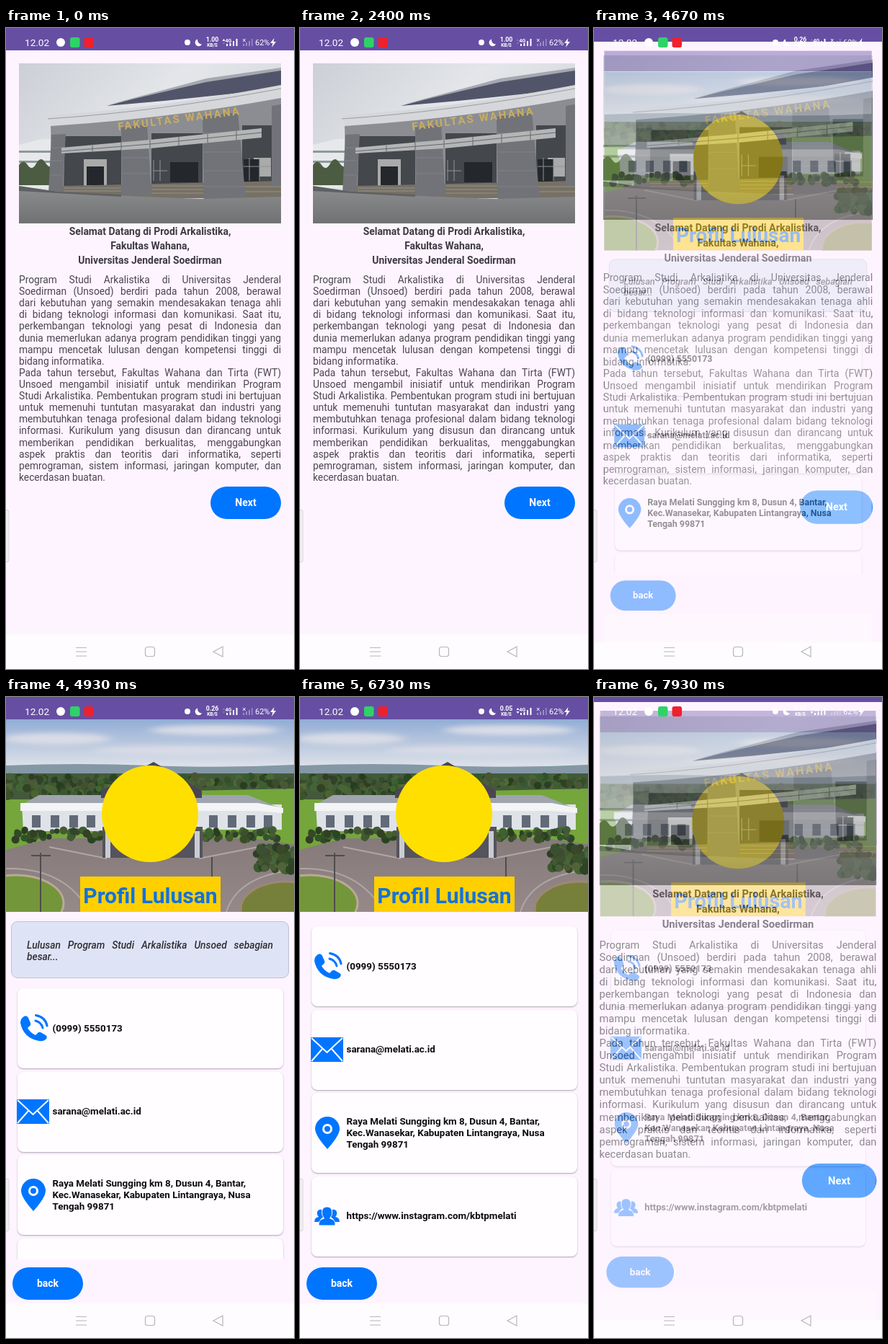
An HTML page for the animation above (8000 ms loop, 400 by 889 pixels).

```html
<!DOCTYPE html>
<html lang="id">
<head>
<meta charset="utf-8">
<style>
html, body { margin: 0; width: 100%; height: 100%; overflow: hidden; }
body { position: relative; font: 13.75px/16.12px Roboto, sans-serif; color: #4a464e; }
div, svg { position: absolute; }
svg { left: 0; top: 0; width: 400px; height: 889px; }
.page { left: 0; top: 0; width: 400px; height: 889px; transform-origin: 200px 444px;
  background: linear-gradient(#664fa3 31px, #fef4ff 31px 841px, #fefcfe 841px); }
.title { left: 0; width: 400px; top: 272px; text-align: center; font: bold 13.9px/20px Roboto, sans-serif; color: #3d3a41; }
.text div { position: static; height: 16.12px; white-space: nowrap; text-align: justify; text-align-last: justify; }
.text .end { text-align-last: left; }
.btn { width: 98px; height: 44.5px; border-radius: 23px; background: #0075ff; color: #fff;
  font: bold 14px/45px Roboto, sans-serif; text-align: center; overflow: hidden; }
.glow { inset: 0; background: #fff; opacity: 0; }
#clip { left: 0; top: 304px; width: 400px; height: 476px; overflow: hidden; }
#list { left: 0; top: -304px; width: 400px; height: 889px; }
.card { left: 15.5px; width: 369px; height: 111px; border-radius: 8px; background: #fffdff; box-shadow: 0 1px 2px #a9a4b0; }
.card span { position: absolute; left: 49px; top: 50%; transform: translateY(-50%); white-space: pre;
  font: bold 13.4px/16px Roboto, sans-serif; color: #0c0c0e; }
.info { left: 7px; top: 311px; width: 384px; height: 77px; border: 1px solid #bcc2d5; border-radius: 9px; background: #dee4f6; }
#bar { left: 387px; width: 4px; background: #9b969f; }
#dot { width: 23px; height: 23px; margin: -12.5px; border: 1px solid #c5bfd4; border-radius: 50%; }
</style>
</head>
<body>
<div class="page" id="home">
  <svg>
    <defs>
      <linearGradient id="cloud" x2="1" y2=".6"><stop stop-color="#cccfd5"/><stop offset=".5" stop-color="#e4e6ea"/><stop offset="1" stop-color="#d2d5da"/></linearGradient>
      <linearGradient id="road" x2="0" y2="1"><stop stop-color="#8b8c8d"/><stop offset="1" stop-color="#707173"/></linearGradient>
      <clipPath id="frame"><path d="M18 49H382V271H18z"/></clipPath>
    </defs>
    <g clip-path="url(#frame)">
      <path fill="url(#cloud)" d="M18 49H382V271H18z"/>
      <path fill="#e6e8e9" d="M18 162L50 154H68V222H18z"/>
      <path fill="#8e979c" d="M18 170H66V173H18zM18 184H66V187H18z"/>
      <path fill="#4c5c42" d="M18 190q6-9 12 0t12-2 12-2 10 6V218H18z"/>
      <path fill="#52556a" d="M140 108L278 71 382 56V84L220 101z"/>
      <path fill="#a5a8af" d="M140 107L278 70 382 55V59L278 75z"/>
      <path fill="#8b8d93" d="M62 134L382 94V230H64z"/>
      <path fill="#44474c" d="M82 150H160V225H80zM202 146H273V219H202zM328 135H382V218H328z"/>
      <path fill="#a9aaa9" d="M108 182H140V219H108zM344 180H368V206H344z"/>
      <path fill="#24272b" d="M112 192H136V218H112zM228 186H267V214H228zM330 182H352V214H330z"/>
      <path fill="none" stroke="#8f9498" d="M205 183V212M214 183V212M204 198H224M338 180V212M352 180V212M330 192H368"/>
      <path fill="#777065" d="M78 219L382 212V236H72z"/>
      <path stroke="#94928c" d="M80 222H160M80 226H160M202 219H274M202 224H274M202 229H274M328 220H382M328 227H382"/>
      <path fill="#717378" d="M63 148L83 147 81 180 78 230H59zM160 138L196 134 202 233H161zM273 123L322 117 333 238H275zM369 108L382 106V218H369z"/>
      <path stroke="#808287" d="M62 166H80M62 184H79M61 204H78M161 158H198M161 180H199M161 202H200M274 146H325M275 172H327M275 198H329M275 220H331"/>
      <path fill="#d6d7da" d="M58 121Q210 112 382 79V97Q230 125 62 136z"/>
      <path fill="none" stroke="#9a9ca2" d="M58 126Q210 116 382 84"/>
      <path fill="#b4b5b6" d="M77 166L200 155 355 139V152L200 167 77 174z"/>
      <path fill="none" stroke="#65676b" d="M77 171L200 161 355 145M120 163V171M160 159V169M200 155V167M240 151V163M280 147V159M320 143V155"/>
      <path fill="url(#road)" d="M18 222L72 229 270 237 382 234V271H18z"/>
      <path fill="#5e6164" d="M18 219L72 227 160 231V234L18 226z"/>
      <text transform="translate(156 142) rotate(-7.4)" font-size="15" font-weight="700" letter-spacing="2.2" fill="#c9ad61">FAKULTAS WAHANA</text>
    </g>
  </svg>
  <div class="title">Selamat Datang di Prodi Arkalistika,<br>Fakultas Wahana,<br>Universitas Jenderal Soedirman</div>
  <div class="text" id="story" style="left:18px;top:341px;width:364px"></div>
  <div class="btn" style="left:284px;top:636px">Next<div class="glow" id="nextGlow"></div></div>
</div>

<div class="page" id="profile">
  <svg>
    <defs>
      <linearGradient id="sky" x2="0" y2="1"><stop stop-color="#92add6"/><stop offset=".45" stop-color="#b9c7de"/><stop offset=".85" stop-color="#dadfe8"/></linearGradient>
      <linearGradient id="yard" x2="0" y2="1"><stop stop-color="#85797a"/><stop offset="1" stop-color="#95898a"/></linearGradient>
      <clipPath id="banner"><path d="M0 31H400V298H0z"/></clipPath>
      <filter id="soft"><feGaussianBlur stdDeviation="8 3"/></filter>
    </defs>
    <g clip-path="url(#banner)">
      <path fill="url(#sky)" d="M0 31H400V104H0z"/>
      <g filter="url(#soft)" fill="#d9dce6"><ellipse cx="70" cy="58" rx="75" ry="8"/><ellipse cx="290" cy="46" rx="90" ry="7"/><ellipse cx="250" cy="74" rx="130" ry="6"/></g>
      <path fill="#8497a5" d="M0 95Q100 91 200 95T400 94V112H0z"/>
      <path fill="#74a63c" d="M0 120H400V215H0z"/>
      <path fill="#43593a" d="M0 106H400V127L260 130 140 142H0z"/>
      <g id="trees"></g>
      <path fill="url(#yard)" d="M0 212L60 196H340L400 204V298H0z"/>
      <path fill="none" stroke="#b1a6a3" stroke-width="2" d="M0 238Q82 236 116 298M400 240Q322 248 306 298M60 208L140 224M268 224L350 208"/>
      <path fill="#dfe2e7" d="M22 149H140V186H24zM262 149H383V184H262z"/>
      <path fill="#9fa4ae" d="M22 149L46 136H140V149zM262 136H336L383 155 262 150z"/>
      <path fill="#f3f4f6" d="M20 147H140V158H20zM262 147H350L385 154V161L350 158H262z"/>
      <path fill="#626a78" d="M36 164H48V181H36zM62 164H74V181H62zM88 164H100V181H88zM112 164H124V181H112zM282 164H294V181H282zM308 164H320V181H308zM334 164H346V181H334zM358 164H370V181H358z"/>
      <path fill="#4a4651" d="M132 130L205 90 272 130V140H132z"/>
      <path fill="#55535d" d="M134 180H273V223H134z"/>
      <path fill="#c9ccd3" d="M138 186H145V223H138zM262 186H269V223H262z"/>
      <g id="bushes"></g>
      <ellipse cx="14" cy="286" rx="66" ry="39" fill="#74963a" stroke="#b9aa96" stroke-width="3"/>
      <ellipse cx="388" cy="294" rx="62" ry="38" fill="#76803a" stroke="#9d8874" stroke-width="3"/>
      <g id="crown"></g>
      <path fill="none" stroke="#4f4c4c" stroke-width="2" d="M48 216V298M35 220H62M286 222V298"/>
      <circle cx="200" cy="162" r="67" fill="#ffdf00"/>
      <path fill="#ffcf00" d="M103 249H298V298H103z"/>
      <text x="200.500" y="286" text-anchor="middle" font-size="30" font-weight="700" fill="#1172dd">Profil Lulusan</text>
    </g>
  </svg>
  <div id="clip">
    <div id="list">
      <div class="info"></div>
      <div class="text" style="left:29px;top:336px;width:342px;font-style:italic;font-weight:500;color:#2e2d33"><div>Lulusan Program Studi Arkalistika Unsoed sebagian</div><div class="end">besar...</div></div>
      <div class="card" style="top:404px"><span>(0999) 5550173</span></div>
      <div class="card" style="top:519.5px"><span>sarana@melati.ac.id</span></div>
      <div class="card" style="top:635px"><span>Raya Melati Sungging km 8, Dusun 4, Bantar,
Kec.Wanasekar, Kabupaten Lintangraya, Nusa
Tengah 99871</span></div>
      <div class="card" style="top:750.5px"><span>https://www.instagram.com/kbtpmelati</span></div>
      <svg fill="#0075ff">
        <path d="M25 443q4-2 6 2l3 7q1 3-2 5l-2 2q4 7 11 10l3-3q2-2 4-1l7 4q3 2 1 5-4 4-10 3-22-4-26-25 0-6 5-9z"/>
        <path fill="none" stroke="#0075ff" stroke-width="3" stroke-linecap="round" d="M41 449Q49 451 51 459M41.500 441.500Q55 444 57 456"/>
        <path d="M15 558H60V592H15z"/>
        <path fill="none" stroke="#fff" stroke-width="2" d="M16 559L37.500 579 59 559M16 591L31 574M59 591L44 574"/>
        <path d="M38 713Q21 694 21 685A17 17 0 0 1 55 685Q55 694 38 713z"/>
        <circle cx="38" cy="685" r="5.500" fill="#0075ff" stroke="#fff" stroke-width="3"/>
        <path d="M20 814q0-6 6-7-3-3-2-7 2-4 6-3 1 7 3 10-5 2-6 7zM55 814q0-6-6-7 3-3 2-7-2-4-6-3-1 7-3 10 5 2 6 7z"/>
        <path stroke="#fffdff" d="M26 819q-1-8 7.500-10-4-4-3-10 1-6 7-6t7 6q1 6-3 10 8.500 2 7.500 10z"/>
      </svg>
    </div>
    <div id="bar"></div>
  </div>
  <div class="btn" style="left:9px;top:791px">back<div class="glow" id="backGlow"></div></div>
</div>

<svg fill="#fff">
  <text x="26" y="25" font-size="13.6">12.02</text>
  <circle cx="76" cy="20" r="6"/>
  <rect x="89" y="13" width="13.500" height="14" rx="3" fill="#2ed367"/>
  <rect x="108.500" y="13" width="13.500" height="14" rx="3" fill="#f0202c"/>
  <circle cx="252" cy="20" r="4"/>
  <path d="M266 15.500a5 5 0 1 0 6 7 6 6 0 0 1-6-7z"/>
  <g font-weight="700" text-anchor="middle">
    <text id="speed" x="286.500" y="19" font-size="8.800"></text>
    <text x="286.500" y="26" font-size="6.500">KB/S</text>
    <text x="309" y="20" font-size="7">4G</text>
  </g>
  <path id="up" d="M300.500 18l2-3 2 3z"/>
  <path id="down" d="M300.500 20l2 3 2-3z"/>
  <path d="M306 22h2v3h-2zM310.500 21h2v4h-2zM315 18h2v7h-2zM319.500 15h2v10h-2z"/>
  <path opacity=".35" d="M329 22h2v3h-2zM333 20h2v5h-2zM337 18h2v7h-2zM341 15h1.500v10h-1.500z"/>
  <path stroke="#fff" d="M329 15l3.500 4M332.500 15l-3.500 4"/>
  <text x="346" y="24" font-size="11">62%</text>
  <path d="M372.500 14l-5.500 7h3.500l-1.500 6 6-8h-3.500z"/>
  <g fill="none" stroke="#b9b6ba" stroke-width="1.200">
    <path d="M97 859.500H112M97 865H112M97 871H112M301 858V872L288 865z"/>
    <rect x="193.500" y="858.500" width="13" height="13" rx="3"/>
  </g>
  <rect x="-3" y="668.500" width="7" height="72" rx="2" fill="#f3edf4" stroke="#dad4dc"/>
</svg>
<div id="dot"></div>

<script>
const $ = id => document.getElementById(id);
const story = `Program Studi Arkalistika di Universitas Jenderal
Soedirman (Unsoed) berdiri pada tahun 2008, berawal
dari kebutuhan yang semakin mendesakakan tenaga ahli
di bidang teknologi informasi dan komunikasi. Saat itu,
perkembangan teknologi yang pesat di Indonesia dan
dunia memerlukan adanya program pendidikan tinggi yang
mampu mencetak lulusan dengan kompetensi tinggi di
bidang informatika.
Pada tahun tersebut, Fakultas Wahana dan Tirta (FWT)
Unsoed mengambil inisiatif untuk mendirikan Program
Studi Arkalistika. Pembentukan program studi ini bertujuan
untuk memenuhi tuntutan masyarakat dan industri yang
membutuhkan tenaga profesional dalam bidang teknologi
informasi. Kurikulum yang disusun dan dirancang untuk
memberikan pendidikan berkualitas, menggabungkan
aspek praktis dan teoritis dari informatika, seperti
pemrograman, sistem informasi, jaringan komputer, dan
kecerdasan buatan.`;
$('story').innerHTML = story.split('\n')
  .map(s => `<div${s.endsWith('.') ? ' class="end"' : ''}>${s}</div>`).join('');

// seeded random foliage inside a box
let seed = 7;
const rnd = () => (seed = seed * 16807 % 2147483647) / 2147483647;
function foliage(id, n, x, y, w, h, r) {
  let out = '';
  for (let i = 0; i < n; i++) {
    const fill = `hsl(${85 + 25 * rnd()} ${22 + 14 * rnd()}% ${18 + 14 * rnd()}%)`;
    out += `<circle cx="${x + w * rnd()}" cy="${y + h * rnd()}" r="${r * (.6 + .6 * rnd())}" fill="${fill}"/>`;
  }
  $(id).innerHTML += out;
}
foliage('trees', 170, 0, 110, 400, 14, 5);
foliage('trees', 60, 0, 122, 145, 16, 5);
foliage('bushes', 45, 12, 184, 122, 14, 5);
foliage('bushes', 45, 274, 184, 106, 14, 5);
foliage('crown', 70, 348, 208, 56, 34, 6);

const LOOP = 8000, STEP = 1000 / 15, OPEN = 4620, CLOSE = 7860;
const clamp = x => Math.min(1, Math.max(0, x));
const ramp = (t, start, length) => clamp((t - start) / length);
const easeOut = x => 1 - (1 - x) ** 2;
const smooth = x => x * x * (3 - 2 * x);
const within = (t, a, b) => t >= a && t < b;

function draw(t) {
  // shown: 0 = home only, 1 = profile only
  const closing = easeOut(ramp(t, CLOSE, 300));
  const opening = easeOut(ramp(t, OPEN, 300));
  const shown = t < CLOSE ? opening : 1 - closing;
  $('home').style.transform = `scale(${1 + .1 * shown})`;
  $('profile').style.transform = `scale(${.9 + .1 * shown})`;
  $('profile').style.opacity = t < CLOSE ? clamp(1.5 * opening) : clamp(1 - 1.45 * closing);

  const scroll = 86 * smooth(ramp(t, 5420, 600));
  $('list').style.transform = `translateY(${-scroll}px)`;
  const top = 377 + (scroll - 80.5) * .85;
  $('bar').style.top = top - 304 + 'px';
  $('bar').style.height = Math.min(401, 778 - top) + 'px';
  $('bar').style.opacity = t < 5430 ? 0 : 1 - ramp(t, 6300, 250);

  $('nextGlow').style.opacity = .27 * ramp(t, 4450, 60) * (1 - ramp(t, OPEN, 200));
  $('backGlow').style.opacity = .27 * ramp(t, 7480, 80) * (1 - ramp(t, 7720, 150));
  const touch = within(t, 4460, 4580) ? [335, 660]
    : within(t, 5390, 6030) ? [331.5, 644.5 - scroll]
    : within(t, 7500, 7690) ? [53.5, 808.5] : null;
  $('dot').style.display = touch ? '' : 'none';
  if (touch) {
    $('dot').style.left = touch[0] + 'px';
    $('dot').style.top = touch[1] + 'px';
    $('dot').style.background = within(t, 5390, 6030) ? '#fff4' : '#c5cad8aa';
  }

  $('speed').textContent = t < 2860 ? '1.00' : t < 6590 ? '0.26' : '0.05';
  const both = within(t, 2860, 4325) || t > 6590;
  $('up').style.opacity = t < 860 || both ? 1 : .2;
  $('down').style.opacity = both ? 1 : .2;
}

function tick(now) {
  const t = now % LOOP;
  draw(Math.floor((t + 5) / STEP) * STEP % LOOP);
  requestAnimationFrame(tick);
}
draw(0);
requestAnimationFrame(tick);
</script>
</body>
</html>
```
